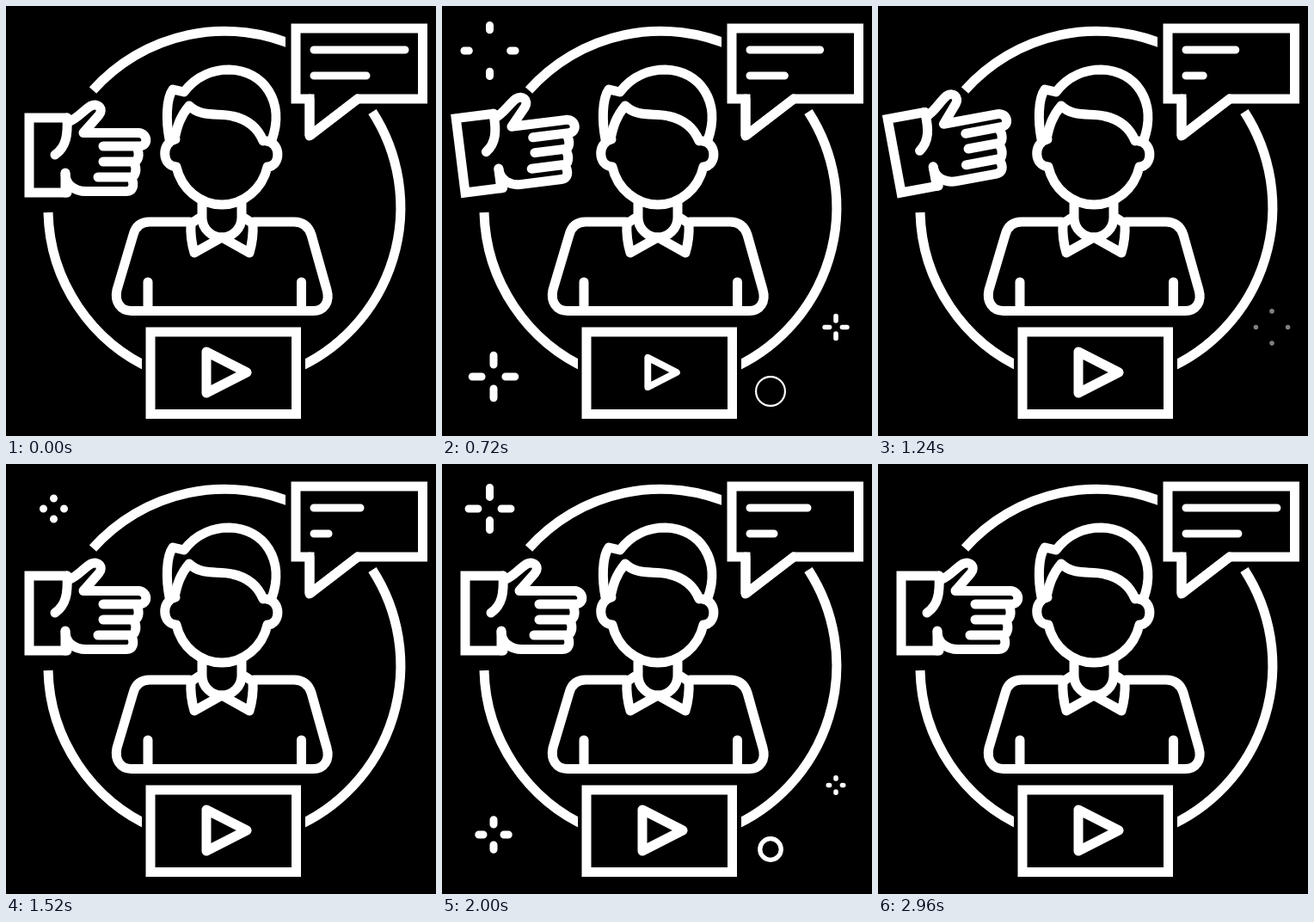
These frames come from a looping animation (500x500 px, 3000 ms). An HTML page:

```html
<!DOCTYPE html>
<html lang="en">
<head>
<meta charset="utf-8">
<title>Presenter icon</title>
<style>
  html, body { margin: 0; width: 100%; height: 100%; overflow: hidden; background: #000; }
  svg { display: block; width: 100%; height: 100%; }
  .ink { fill: none; stroke: #fff; stroke-width: 11; stroke-linecap: round; stroke-linejoin: round; }
  .sharp { stroke-linejoin: miter; stroke-miterlimit: 2; }
</style>
</head>
<body>
<svg viewBox="0 0 500 500">
  <g class="ink">
    <path stroke-linecap="butt" d="M101 98A205 205 0 0 1 340 48M426 123A205 205 0 0 1 334 423M49 240A205 205 0 0 0 172 423"/>
    <path fill="#000" stroke="none" d="M325 14H496V114H325ZM158 367H348V486H158Z"/>

    <path class="sharp" d="M337 26H484.500V108H409L353 151V108H337Z"/>
    <path d="M353 108V151L409 108"/>
    <path id="text" stroke-width="9"/>

    <path class="sharp" d="M168 379H337.500V474.500H168Z"/>
    <path id="play" d="M233 402V450L280 426Z"/>

    <!-- hair, ears and face -->
    <path d="M190 155C186 134 186 108 194 97L207 100C222 80 243 74 260 74C300 75 325 112 309 156"/>
    <path d="M196 155C199 139 203 128 213 116C227 130 246 124 263 128C282 132 293 142 299 157"/>
    <path d="M197 155C180 159 181 186 198 187C204 213 226 231 251 231C276 231 298 213 304 187C320 186 320 159 303 157"/>
    <!-- neck, collar and body -->
    <path d="M228 230V246C228 259 239 269 251 269C263 269 274 259 274 246V230"/>
    <path d="M224 247L215 253Q214 270 219 287L251 269L283 287Q288 270 287 253L278 247"/>
    <path d="M214 251H167Q152 251 148 266L129 330C126 344 133 354.500 146 354.500H357C370 354.500 377 344 373 330L355 266Q350 251 335 251H288"/>
    <path d="M165 321V350M343.500 321V350"/>

    <g id="hand">
      <path d="M69 194V217H71"/>
      <path class="sharp" d="M69 217H27V130H71"/>
      <path d="M71 130C72 150 70 164 57 173"/>
      <path d="M72 135C83 131 89 122 99 116C107 112 114 120 108 127L90 147.500H154C165 148 166 163 155 163H113M152 164C156 173 154 181 148 181H113M149 182C153 191 150 199 145 199H107M146 200C150 209 147 215.500 140 215.500H93C80 215.500 69 208 69 195"/>
    </g>

    <path class="spark" transform="translate(55.500 52)" stroke-width="9"/>
    <path class="spark" transform="translate(60 431)" stroke-width="9"/>
    <path class="spark" transform="translate(458 373.500) scale(.62)" stroke-width="9"/>
    <circle id="ring" cx="382" cy="448"/>
  </g>
</svg>
<script>
const LOOP = 3000, BURST = 1500, STEP = 40;
const get = id => document.getElementById(id);
const sparks = [...document.querySelectorAll('.spark')];
const delays = [0, 210, 325];

// Sine ease from 0 to 1 between two times
const ease = (t, from, to) => {
  const u = Math.min(1, Math.max(0, (t - from) / (to - from)));
  return (1 - Math.cos(Math.PI * u)) / 2;
};

function drawText(t) {
  const c = Math.cos(2 * Math.PI * t / LOOP);
  get('text').setAttribute('d', `M358 51H${438 + 26 * c}M358 81H${397 + 22 * c}`);
}

function drawPlay(t) {
  const scale = 1 - 0.4 * (ease(t, 0, 530) - ease(t, 530, 1060));
  get('play').setAttribute('transform', `translate(255 426) scale(${scale}) translate(-255 -426)`);
}

function drawHand(t) {
  const angle = -12 * (ease(t, 480, 910) - ease(t, 1160, 1500));
  get('hand').setAttribute('transform', `rotate(${angle} 27 217)`);
}

// Four dashes run outwards, then their tails catch up and fade
function drawSpark(el, age) {
  const far = 12 + 18 * ease(age, 0, 800);
  const near = Math.min(far - 0.01, 12 + 18 * ease(age, 400, 920));
  el.setAttribute('d', `M${near} 0H${far}M${-near} 0H${-far}M0 ${near}V${far}M0 ${-near}V${-far}`);
  el.setAttribute('opacity', age > 0 ? 1 - ease(age, 820, 1010) : 0);
}

// A dot grows and opens into a thin ring
function drawRing(age) {
  const outer = 18 * ease(age, 100, 650);
  const width = Math.min(outer, 2 + 9 * (1 - ease(age, 100, 780)));
  const ring = get('ring');
  ring.setAttribute('r', outer - width / 2);
  ring.setAttribute('stroke-width', width);
  ring.setAttribute('opacity', 1 - ease(age, 760, 960));
}

const start = performance.now();
function frame() {
  const elapsed = (performance.now() - start) % LOOP;
  const t = Math.floor(elapsed / STEP) * STEP;
  const age = t % BURST;
  drawText(t);
  drawPlay(t);
  drawHand(t);
  sparks.forEach((el, i) => drawSpark(el, age - delays[i]));
  drawRing(age);
  requestAnimationFrame(frame);
}
frame();
</script>
</body>
</html>
```
